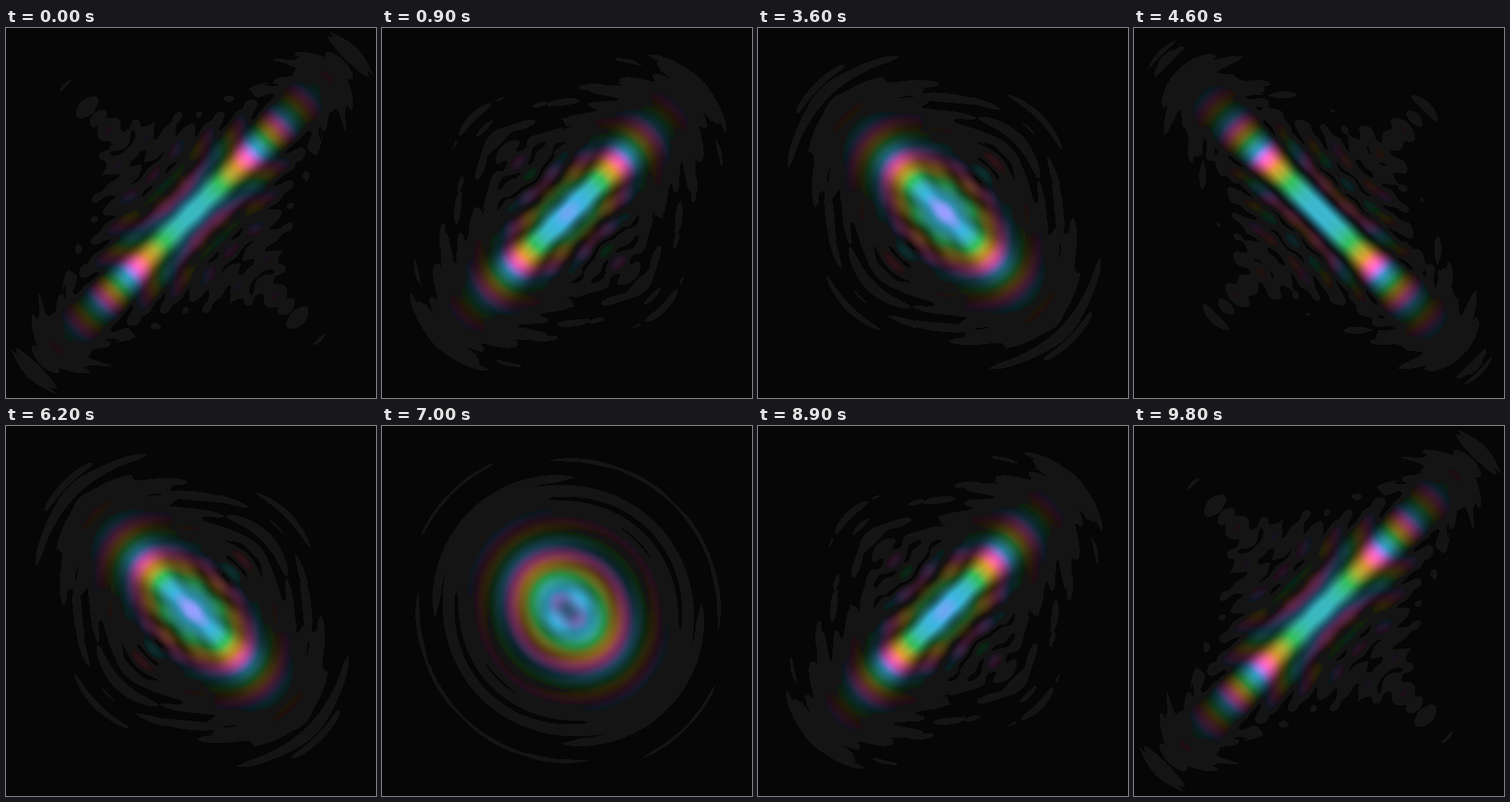
Recreate the animation shown at these times as an HTML page with a canvas. Size 432 by 432 pixels, loop 9.9 s.

```html
<!DOCTYPE html>
<html>
<head>
<meta charset="utf-8">
<style>
html, body { margin: 0; width: 100%; height: 100%; overflow: hidden; background: #060606; }
canvas { display: block; }
</style>
</head>
<body>
<canvas id="stage" width="432" height="432"></canvas>
<script>
// Diffraction pattern of a defocused round pupil while its astigmatism swings
// from one diagonal to the other. Hue shows phase, lightness shows amplitude.
const SIZE = 432, CX = 217, CY = 215, REACH = 436;
const CELLS = 32, DEFOCUS = 6.8, ASTIGMATISM = 8.1, TAPER = 0.5, SCALE = 0.174;
const HUE_SHIFT = 172, GAIN = 4.1, GAMMA = 0.85;
const STEP_MS = 100, STEPS = 99, TURN = 49;

const ctx = document.getElementById('stage').getContext('2d');
const image = ctx.createImageData(SIZE, SIZE);

// Evenly light hues, 45 degrees apart
const wheel = [[247, 113, 137], [206, 143, 49], [150, 163, 49], [50, 176, 85],
  [53, 172, 164], [56, 167, 208], [163, 139, 244], [245, 101, 204]];
const hues = Array.from({ length: 360 }, (_, h) => {
  const i = Math.floor(h / 45), f = h / 45 - i;
  return wheel[i].map((c, k) => c + (wheel[(i + 1) % 8][k] - c) * f);
});

const mid = i => (i + 0.5) / CELLS;
const cosines = new Float32Array(REACH * CELLS);
for (let p = 0; p < REACH; p++)
  for (let i = 0; i < CELLS; i++)
    cosines[p * CELLS + i] = Math.cos(SCALE * p / Math.SQRT2 * mid(i));

const weights = new Float32Array(CELLS * CELLS);
for (let i = 0; i < CELLS; i++)
  for (let j = 0; j < CELLS; j++) {
    const r = Math.hypot(mid(i), mid(j));
    const cover = Math.max(0, Math.min(1, (1 - r) * CELLS + 0.5));
    weights[i * CELLS + j] = cover * Math.exp(-TAPER * r * r) * 4 / Math.PI / CELLS ** 2;
  }

const rowRe = new Float32Array(CELLS), rowIm = new Float32Array(CELLS);
const colors = new Uint8ClampedArray(REACH * REACH * 3);

function shade(re, im, at) {
  const light = Math.min(1.08, GAIN * Math.hypot(re, im) ** GAMMA);
  const hue = Math.floor(Math.atan2(im, re) * 180 / Math.PI + HUE_SHIFT + 720) % 360;
  const rgb = hues[hue], peak = Math.max(...rgb) * light;
  for (let k = 0; k < 3; k++)
    colors[at + k] = peak < 13 ? 6 : peak < 28 ? 20 : rgb[k] * light;
}

function draw(astigmatism) {
  const pupilRe = new Float32Array(CELLS * CELLS), pupilIm = new Float32Array(CELLS * CELLS);
  for (let i = 0; i < CELLS; i++)
    for (let j = 0; j < CELLS; j++) {
      const n = i * CELLS + j;
      const phase = (DEFOCUS + astigmatism) * mid(i) ** 2 + (DEFOCUS - astigmatism) * mid(j) ** 2;
      pupilRe[n] = weights[n] * Math.cos(phase);
      pupilIm[n] = weights[n] * Math.sin(phase);
    }
  // p and q run along the diagonals; the pattern is even in both
  for (let p = 0; p < REACH; p++) {
    rowRe.fill(0);
    rowIm.fill(0);
    for (let i = 0; i < CELLS; i++) {
      const c = cosines[p * CELLS + i];
      for (let j = 0; j < CELLS; j++) {
        rowRe[j] += c * pupilRe[i * CELLS + j];
        rowIm[j] += c * pupilIm[i * CELLS + j];
      }
    }
    for (let q = p % 2; q < REACH - p; q += 2) {
      let re = 0, im = 0;
      for (let j = 0; j < CELLS; j++) {
        const c = cosines[q * CELLS + j];
        re += c * rowRe[j];
        im += c * rowIm[j];
      }
      shade(re, im, (p * REACH + q) * 3);
    }
  }
  for (let y = 0, n = 0; y < SIZE; y++)
    for (let x = 0; x < SIZE; x++, n += 4) {
      const dx = x - CX, dy = y - CY;
      const at = (Math.abs(dx - dy) * REACH + Math.abs(dx + dy)) * 3;
      for (let k = 0; k < 3; k++) image.data[n + k] = colors[at + k];
      image.data[n + 3] = 255;
    }
  ctx.putImageData(image, 0, 0);
}

let shown = -1;
function tick() {
  const step = Math.floor(performance.now() / STEP_MS) % STEPS;
  if (step !== shown) {
    shown = step;
    draw(ASTIGMATISM * (1 - 2 * Math.min(step, 2 * TURN - step) / TURN));
  }
  requestAnimationFrame(tick);
}
tick();
</script>
</body>
</html>
```
